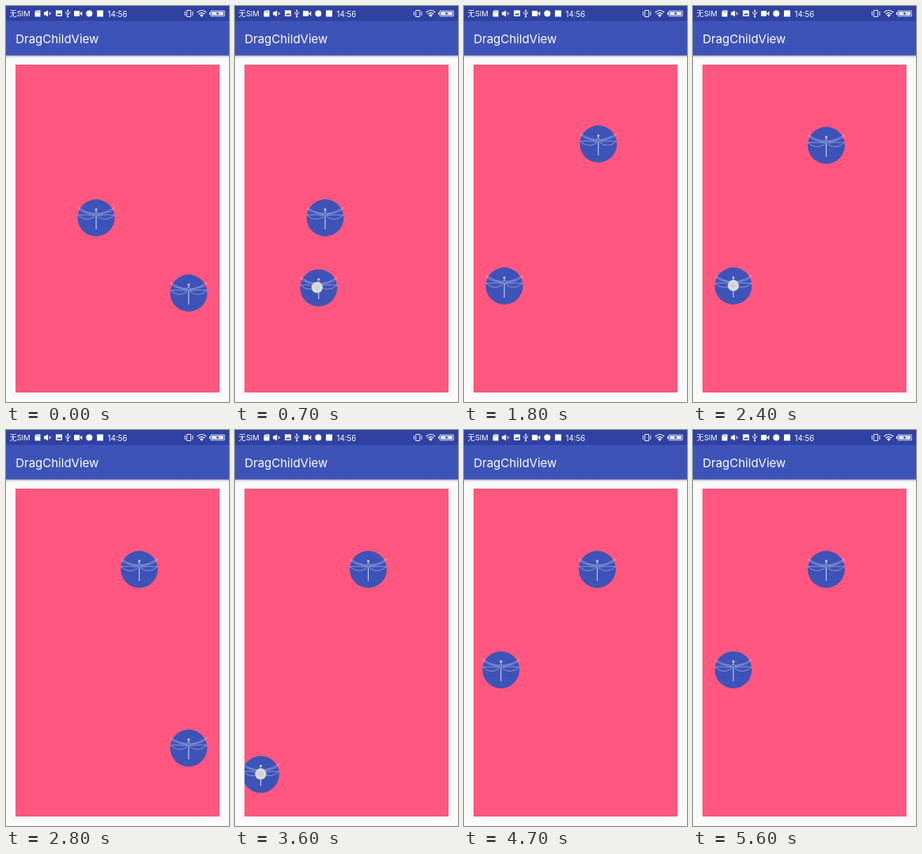
An HTML page with a canvas that plays this animation: 282 by 500 pixels, repeating every 6.3 s.

```html
<!DOCTYPE html>
<html lang="en">
<head>
<meta charset="utf-8">
<title>DragChildView</title>
<style>
html, body { margin: 0; width: 100%; height: 100%; overflow: hidden; background: #fafafa; }
canvas { display: block; width: 282px; height: 500px; }
</style>
</head>
<body>
<canvas id="stage"></canvas>
<script>
const W = 282, H = 500, LOOP = 6300, STEP = 100, RADIUS = 23.4;
const TRAVEL = 300, SETTLE = 200;
const BLUE = '#3d53b7', DARK = '#2f41a1', PINK = '#ff577f', WHITE = '#fff';
const canvas = document.getElementById('stage');
const ctx = canvas.getContext('2d');
const ratio = window.devicePixelRatio || 1;
canvas.width = W * ratio;
canvas.height = H * ratio;
ctx.scale(ratio, ratio);

const LEFT = 51, RIGHT = 231;
const upper = { x: 114, y: 267.5 };
const lower = { x: RIGHT, y: 362.5 };

// A finger carries a ball to `drop`; let go, it slides on to `rest`.
const drags = [
  { at: 500, ball: lower, drop: { x: 62, y: 353.5 }, rest: { x: LEFT, y: 353.5 }, grip: -2 },
  { at: 1400, ball: upper, drop: { x: 174, y: 169 }, rest: { x: 168.5, y: 176 }, grip: -7 },
  { at: 2400, ball: lower, drop: { x: RIGHT, y: 401.6 }, rest: { x: RIGHT, y: 401.6 }, grip: 0 },
  { at: 3300, ball: lower, drop: { x: 32.5, y: 434.8 }, rest: { x: LEFT, y: 438 }, grip: 0 },
  { at: 4300, ball: lower, drop: { x: 34, y: 302.8 }, rest: { x: LEFT, y: 302.8 }, grip: 0 }
];

const clamp = p => Math.min(1, Math.max(0, p));
const smooth = p => p * p * (3 - 2 * p);
const easeOut = p => 1 - (1 - p) ** 2;
const mix = (a, b, p) => ({ x: a.x + (b.x - a.x) * p, y: a.y + (b.y - a.y) * p });

function position(ball, t) {
  let place = ball;
  for (const drag of drags) {
    if (drag.ball !== ball || t < drag.at) continue;
    const age = t - drag.at;
    place = age <= TRAVEL
      ? mix(place, drag.drop, smooth(age / TRAVEL))
      : mix(drag.drop, drag.rest, easeOut(clamp((age - TRAVEL) / SETTLE)));
  }
  return place;
}

function box(x, y, w, h, color = WHITE) {
  ctx.fillStyle = color;
  ctx.fillRect(x, y, w, h);
}

function disc(x, y, r, color = WHITE) {
  ctx.fillStyle = color;
  ctx.beginPath();
  ctx.arc(x, y, r, 0, 2 * Math.PI);
  ctx.fill();
}

function line(d, color = WHITE, width = 1) {
  ctx.strokeStyle = color;
  ctx.lineWidth = width;
  ctx.stroke(new Path2D(d));
}

function shape(d, color = WHITE) {
  ctx.fillStyle = color;
  ctx.fill(new Path2D(d));
}

function label(text, x, y, size) {
  ctx.fillStyle = WHITE;
  ctx.font = `${size}px Inter, "Noto Sans CJK SC", sans-serif`;
  ctx.fillText(text, x, y);
}

// Status icons are drawn around their own centres.
const icons = [
  [40, () => {
    shape('M-2 -4H3.5V4H-3.5V-2Z');
    line('M-1 -3V-1M1 -3V-1', DARK, .7);
  }],
  [53, () => {
    shape('M-5 -2H-3L0 -4V4L-3 2H-5Z');
    line('M1.5 -2Q3 0 1.5 2M3.5 -1V1', WHITE, .9);
  }],
  [67, () => {
    box(-4, -4, 8, 7.5);
    shape('M-3 2L-1 -.5L.2 1L1.5 -1L3 2Z', DARK);
  }],
  [78.2, () => {
    line('M0 -4V4M-2.4 -2V0L0 2M2.4 -2V-.5L0 1', WHITE, .9);
    shape('M0 -5.3L1.4 -3H-1.4Z');
    disc(0, 4, 1.1);
  }],
  [91, () => {
    box(-5, -3.4, 7, 6.8);
    shape('M2 0L5.3 -3V3Z');
  }],
  [105.3, () => disc(0, 0, 4)],
  [119, () => box(-4, -4, 8, 8)],
  [231.2, () => line('M-2.5 -4H2.5V4H-2.5ZM-4.8 -2.7V2.7M4.8 -2.7V2.7', WHITE, .9)],
  [247.5, () => {
    line('M-5.8 -1.5Q0 -6.5 5.8 -1.5M-3.8 .7Q0 -2.5 3.8 .7', WHITE, 1.2);
    shape('M-2.3 1.9Q0 .2 2.3 1.9L0 4.4Z');
  }],
  [267.5, () => {
    line('M-8.5 -3.3H8.8V3.3H-8.5Z', WHITE, .8);
    box(-7.2, -2, 14.6, 4);
    box(-10.4, -1.5, 1.2, 3);
    shape('M-3 .3L1 -2L.3 -.4H3L-1 2L-.3 .3Z', DARK);
  }]
];

function statusBar() {
  box(0, 0, W, 19, DARK);
  label('无SIM', 4.6, 13.2, 9.3);
  label('14:56', 128.6, 13.7, 9.7);
  for (const [x, drawIcon] of icons) {
    ctx.save();
    ctx.translate(x, 9.5);
    drawIcon();
    ctx.restore();
  }
}

function toolbar() {
  const shade = ctx.createLinearGradient(0, 62, 0, 66);
  shade.addColorStop(0, '#c0c1c8');
  shade.addColorStop(1, '#fafafa');
  box(0, 62, W, 4, shade);
  box(0, 19, W, 43.5, BLUE);
  label('DragChildView', 12.2, 47, 15);
}

function wings() {
  const ink = 'rgba(225,229,250,.75)';
  line('M-23.5 -13.5Q-12 -6 -2 -5.5M-22.5 -12Q-21 -7.5 -2 -4', ink, .6);
  line('M-2 -3Q-12 -4.5 -23 -3.5M-23 -3.5Q-13 6 -2 -1.5', ink, .6);
}

function dragonfly() {
  const ink = 'rgba(235,238,252,.8)';
  wings();
  ctx.scale(-1, 1);
  wings();
  disc(0, -10.5, 1.5, ink);
  line('M0 -8.5Q3 -5 0 -1.5Q-3 -5 0 -8.5', ink, .7);
  line('M0 -1.5V14.5', ink, 1.1);
}

function drawBall({ x, y }) {
  disc(x, y, RADIUS, BLUE);
  ctx.save();
  ctx.translate(x, y);
  dragonfly();
  ctx.restore();
}

function touchDot(x, y) {
  const glow = ctx.createRadialGradient(x, y, 1, x, y, 7.2);
  glow.addColorStop(0, '#cfd0d8');
  glow.addColorStop(.75, '#dedee2');
  glow.addColorStop(1, '#c2c4d2');
  disc(x, y, 7.2, glow);
}

function draw(t) {
  box(0, 0, W, H, '#fafafa');
  statusBar();
  toolbar();
  box(12, 74, 258, 414, PINK);
  ctx.save();
  ctx.beginPath();
  ctx.rect(12, 74, 258, 414);
  ctx.clip();
  drawBall(position(upper, t));
  drawBall(position(lower, t));
  ctx.restore();
  const held = drags.find(({ at }) => t >= at && t <= at + TRAVEL);
  if (held) {
    const { x, y } = position(held.ball, t);
    touchDot(x + held.grip, y - .5);
  }
}

const start = performance.now();
function tick() {
  const elapsed = (performance.now() - start) % LOOP;
  draw(Math.floor(elapsed / STEP) * STEP);
  requestAnimationFrame(tick);
}
tick();
</script>
</body>
</html>
```
